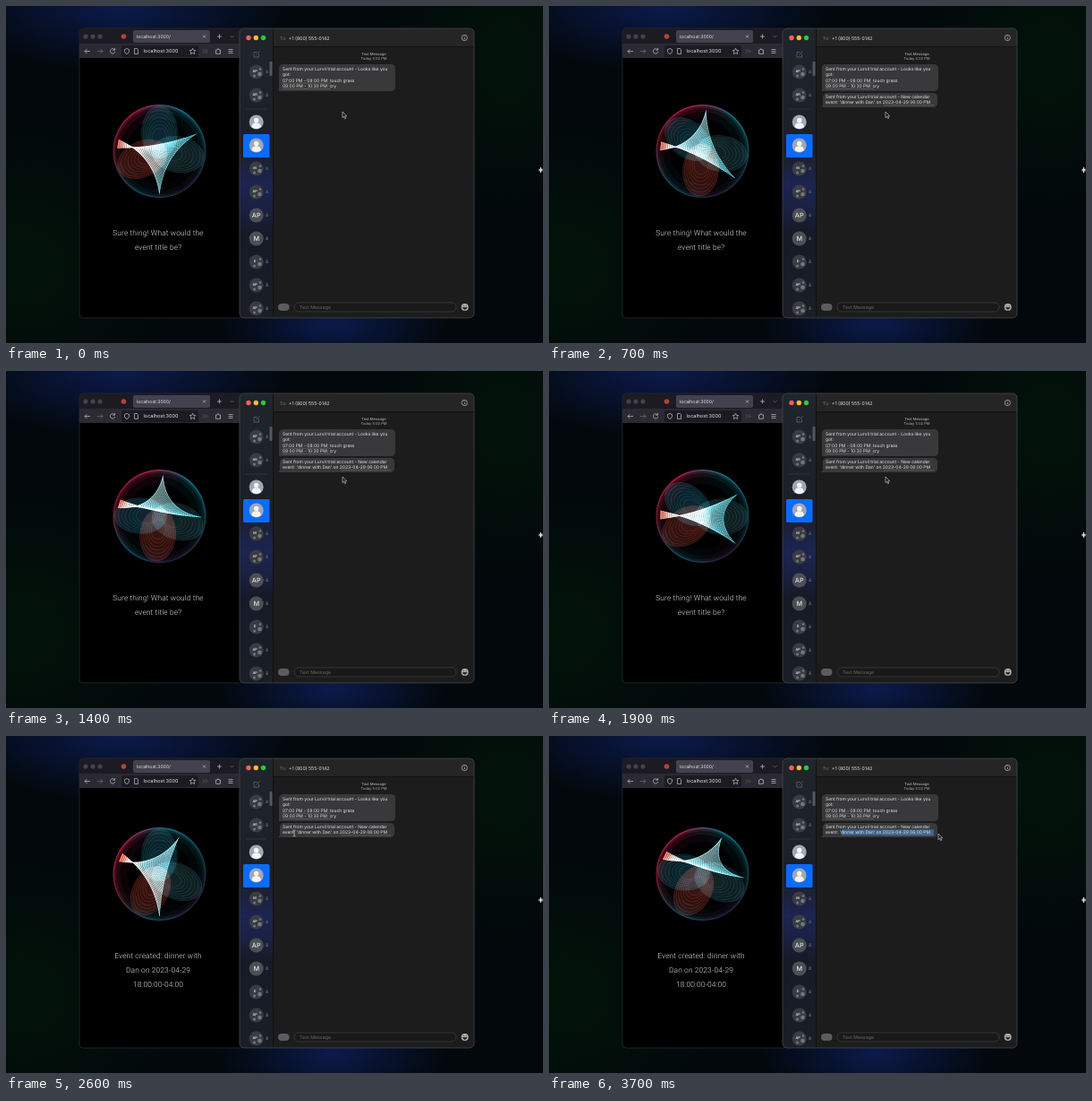
Animation, 600 px wide and 376 px high, one loop 3750 ms. Source, as an HTML page with a canvas:

```html
<!DOCTYPE html>
<html lang="en">
<head>
<meta charset="utf-8">
<style>
  html, body { margin: 0; width: 100%; height: 100%; overflow: hidden; background: #02080b; }
  svg, canvas { position: absolute; left: 0; top: 0; width: 600px; height: 376px; }
  text { font-family: Inter, sans-serif; fill: #e6e6e6; white-space: pre; text-rendering: geometricPrecision; }
  .reply text { font: 300 8.4px Roboto, sans-serif; letter-spacing: .13px; text-anchor: middle; fill: #dcdcdc; }
  .msg { font-size: 4.95px; }
  .mid { text-anchor: middle; }
  .line { fill: none; stroke: #c4c4c8; stroke-width: .7; }
  .dim { stroke: #707078; }
  .rule { stroke: #888; stroke-width: .4; }
</style>
</head>
<body>
<svg viewBox="0 0 600 376">
  <defs>
    <radialGradient id="navy"><stop stop-color="#0c1a4c"/><stop offset="1" stop-color="#0c1a4c" stop-opacity="0"/></radialGradient>
    <radialGradient id="green"><stop stop-color="#021309"/><stop offset="1" stop-color="#021309" stop-opacity="0"/></radialGradient>
    <linearGradient id="side" x2="0" y2="1">
      <stop stop-color="#20242b"/><stop offset=".42" stop-color="#1b1f29"/><stop offset=".54" stop-color="#1c2450"/>
      <stop offset=".62" stop-color="#1a2142"/><stop offset=".7" stop-color="#161a28"/><stop offset="1" stop-color="#1b1e25"/>
    </linearGradient>
  </defs>
  <rect width="600" height="376" fill="#02080b"/>
  <ellipse cx="20" cy="290" rx="180" ry="170" fill="url(#green)"/>
  <ellipse cx="560" cy="60" rx="150" ry="180" fill="url(#green)"/>
  <ellipse cx="130" cy="0" rx="190" ry="75" fill="url(#navy)"/>
  <ellipse cx="365" cy="355" rx="130" ry="55" fill="url(#navy)"/>

  <!-- browser -->
  <rect x="82" y="25" width="184" height="323" rx="4" stroke="#303038" stroke-width=".7"/>
  <path d="M82 42V29q0-4 4-4H266V42z" fill="#1c1b22"/>
  <path d="M82 42H266V58H82z" fill="#2b2a33"/>
  <g fill="#44434a"><circle cx="89" cy="34" r="2.6"/><circle cx="97" cy="34" r="2.6"/><circle cx="105" cy="34" r="2.6"/></g>
  <circle cx="131.5" cy="34" r="2.8" fill="#b0453a"/>
  <rect x="142" y="27" width="86" height="14" rx="2" fill="#42414d"/>
  <text x="146" y="36" font-size="5.1">localhost:3000/</text>
  <rect x="129" y="44" width="86" height="13" rx="2" fill="#1c1b22"/>
  <text x="153.5" y="52.4" font-size="5.5">localhost:3000</text>
  <path class="line" d="M220 32.500l3 3m0-3l-3 3M236 34h5m-2.500-2.500v5M88 50.500h6m-6 0l2.500-2.500m-2.500 2.500l2.500 2.500M121.500 49a2.700 2.700 0 1 0 .3 2m-.2-4v2.200h-2.200M135 47.500l2.500 1v2q0 2-2.500 3.200q-2.500-1.200-2.500-3.200v-2zM143.500 47.500h3l1 1.200v4.800h-4zM208.500 47.200l1 2.200 2.300.2-1.700 1.600.5 2.400-2.100-1.200-2.100 1.200.5-2.400-1.700-1.600 2.300-.2zM234.500 49h1.500q1-3 2 0h1.500v4.300h-5zM248.500 48.500h5m-5 2h5m-5 2h5"/>
  <path class="line dim" d="M102 50.500h6m0 0l-2.500-2.500m2.500 2.500l-2.500 2.500M250.500 33l2 2 2-2M220 48.500l2 2-2 2m3-4l2 2-2 2"/>
  <g id="ask" class="reply">
    <text x="170" y="256">Sure thing! What would the</text>
    <text x="170" y="272">event title be?</text>
  </g>
  <g id="done" class="reply">
    <text x="170" y="248">Event created: dinner with</text>
    <text x="170" y="264">Dan on 2023-04-29</text>
    <text x="170" y="280">18:00:00-04:00</text>
  </g>

  <!-- chat -->
  <rect x="261" y="25" width="262" height="323" rx="5" fill="#1c1c1c"/>
  <path d="M298.500 25H518q5 0 5 5V45H298.500z" fill="#252525"/>
  <path d="M298.500 25V348H266q-5 0-5-5V30q0-5 5-5z" fill="url(#side)"/>
  <path d="M298.500 25V348M298.500 45.500H523" stroke="#0d0d0d" stroke-width=".7"/>
  <rect x="261" y="25" width="262" height="323" rx="5" fill="none" stroke="#46474b" stroke-width=".8"/>
  <g><circle cx="271" cy="35.5" r="2.7" fill="#fe5f57"/><circle cx="279.3" cy="35.5" r="2.7" fill="#febc2e"/><circle cx="287.5" cy="35.5" r="2.7" fill="#28c840"/></g>
  <path class="line dim" d="M280.500 51.500h-3.500v5.500h5.500v-3.500M279.500 54.500l4-4"/>
  <path d="M268 115h23" stroke="#353a44" stroke-width=".7"/>
  <rect x="294.5" y="62" width="3" height="16" rx="1" fill="#54575c"/>
  <rect x="265" y="143" width="29.5" height="26" rx="1.5" fill="#0a6cff"/>
  <g id="people"></g>
  <text x="306" y="37.8" font-size="5.2" style="fill:#777">To:</text>
  <text x="316" y="37.8" font-size="5.2">+1 (800) 555-0142</text>
  <circle class="line" cx="512.3" cy="35.5" r="3.1"/><path class="line" d="M512.300 35v2.200m0-3.800v.8"/>
  <g class="mid" font-size="4.1"><text x="411" y="55.3" font-weight="500" style="fill:#aaa">Text Message</text><text x="411" y="60.3" style="fill:#aaa">Today 5:02 PM</text></g>
  <path d="M305 95v-25q0-5 5-5h120q5 0 5 5v20q0 5-5 5z" fill="#39393b"/>
  <g class="msg">
    <text x="309" y="72">Sent from your Lurvil trial account - Looks like you</text>
    <text x="309" y="78.3">got:</text>
    <text x="309" y="84.8">07:00 PM - 08:00 PM: touch grass</text>
    <text x="309" y="91.1">09:00 PM - 10:30 PM: cry</text>
    <path class="rule" d="M309 86.200h54M309 92.500h54"/>
  </g>
  <g id="news" class="msg">
    <path d="M304 113q2-1 2-3v-8q0-5 5-5h118q5 0 5 5v6q0 5-5 5z" fill="#39393b"/>
    <rect id="mark" x="327" y="104.3" width="0" height="6.6" fill="#3f6590"/>
    <text x="309" y="103">Sent from your Lurvil trial account - New calendar</text>
    <text x="309" y="109.3">event: 'dinner with Dan' on 2023-04-29 06:00 PM</text>
    <path class="rule" d="M374 110.700h56"/>
  </g>
  <rect x="304" y="332" width="12.5" height="8" rx="4" fill="#5c5c60"/>
  <rect x="322" y="331" width="181" height="10" rx="5" fill="#191919" stroke="#414144" stroke-width=".7"/>
  <text x="328" y="337.9" font-size="5.3" style="fill:#69696c">Text Message</text>
  <circle cx="512.7" cy="336" r="4" fill="#b0b0b3"/>
  <path d="M510.300 336.500q2.400 4 4.800 0zM511.300 334v1.200m2.800-1.200v1.200" fill="#222" stroke="#222" stroke-width=".7"/>

  <circle cx="598" cy="183" r="4" fill="#000"/>
  <path d="M595 183h5m-2.500-3v6M596 181.500l3 3m0-3l-3 3" stroke="#eee"/>
  <path id="arrow" d="M0-3V3.600L1.500 2.200 2.700 4.700 3.700 4.200 2.600 1.800H4.600z" fill="#111" stroke="#ddd" stroke-width=".6"/>
  <path id="beam" class="line" d="M-1.500-3.500Q0-3.500 0-2.500V2.500Q0 3.500-1.500 3.500M1.500-3.500Q0-3.500 0-2.500M0 2.500Q0 3.500 1.500 3.500"/>
</svg>
<canvas id="orb" width="1200" height="752"></canvas>

<script>
const $ = id => document.getElementById(id);
const LOOP = 3750, STEP = 50, NEWS_AT = 300, REPLY_AT = 2300;
const TAU = Math.PI * 2, RADIUS = 52;
const mix = (a, b, u) => a + (b - a) * u;
const clamp = u => Math.min(1, Math.max(0, u));

// Sidebar: '*' is a silhouette, '!' marks a single contact, the rest are groups
$('people').innerHTML = ['AP', 'AR', '*', '*', 'M', 'AP', 'AP!', 'M!', 'D', 'AP', 'AP'].map((name, i) => {
  const y = i < 2 ? 73.5 + i * 26 : 77.5 + i * 26;
  const disc = fill => `<circle cx="279.7" cy="${y}" r="8" fill="${fill}"/>`;
  const bell = `<path d="M289.800 ${y + 1.5}q.8-1 .8-2.500t1-1.500 1 1.500.8 2.500z" fill="#484d59"/>`;
  if (name === '*') return disc('#a2a7b1') +
    `<g fill="#f4f4f6"><circle cx="279.7" cy="${y - 2}" r="2.7"/><path d="M274.500 ${y + 5.5}q0-4.700 5.200-4.700t5.200 4.700q-5.200 4-10.400 0"/></g>`;
  if (name.endsWith('!')) return disc('#4c4f55') + bell +
    `<text class="mid" x="279.7" y="${y + 2.6}" font-size="7.2" font-weight="500">${name.slice(0, -1)}</text>`;
  return disc('#393c43') + bell +
    `<text class="mid" x="278" y="${y}" font-size="3.8" font-weight="600">${name}</text>
     <g fill="#74777e"><circle cx="283.5" cy="${y + 2.5}" r="2.3"/><circle cx="277.5" cy="${y + 4.5}" r="1.5"/><circle cx="284" cy="${y - 3}" r="1.3"/></g>`;
}).join('');

const ctx = $('orb').getContext('2d');
const polar = (degrees, r) => [r * Math.cos(degrees * TAU / 360), r * Math.sin(degrees * TAU / 360)];
const blend = (p, q, u) => [mix(p[0], q[0], u), mix(p[1], q[1], u)];
const bend = (p, c, q, u) => blend(blend(p, c, u), blend(c, q, u), u);
// Control point that draws the side between two arm tips in towards the middle
const waist = (p, q) => [(p[0] + q[0]) * .13, (p[1] + q[1]) * .13];

function drawRing(s) {
  const glow = ctx.createConicGradient(.3 * Math.sin(s * TAU / 3.75), 0, 0);
  const colors = ['#0c3038', '#22152a', '#0b3a46', '#5c1224', '#861436', '#0b5a66', '#0c3038'];
  colors.forEach((color, i) => glow.addColorStop(i / (colors.length - 1), color));
  ctx.strokeStyle = glow;
  for (let width = 1; width <= 16; width *= 2) {
    ctx.globalAlpha = .5 / Math.sqrt(width);
    ctx.lineWidth = width;
    ctx.beginPath();
    ctx.arc(0, 0, RADIUS - width / 2, 0, TAU);
    ctx.stroke();
  }
  ctx.globalAlpha = 1;
}

// Translucent oval lying opposite an arm
function drawLobe(degrees, rgb) {
  ctx.save();
  ctx.rotate((degrees + 180) * TAU / 360);
  for (let i = 0; i < 7; i++) {
    ctx.beginPath();
    ctx.ellipse(21 - i, 0, 29 - 3 * i, 20 - 2 * i, 0, 0, TAU);
    ctx.fillStyle = `rgba(${rgb},${i ? .02 : .22})`;
    ctx.fill();
    ctx.strokeStyle = `rgba(${rgb},.28)`;
    ctx.stroke();
  }
  ctx.restore();
}

// Three-armed sheet: threads fan from the left tip to the side joining the other two
function drawSheet(left, top, right) {
  const above = waist(left, top), below = waist(left, right), far = waist(top, right);
  const thread = u => ({
    from: [left[0] - left[1] * .2 * (u - .5), left[1] + left[0] * .2 * (u - .5)],
    via: blend(above, below, u),
    to: bend(top, far, right, u)
  });
  const shade = ctx.createLinearGradient(left[0], left[1], -left[0], -left[1]);
  shade.addColorStop(0, '#d8604c');
  shade.addColorStop(.22, '#a8ccd0');
  shade.addColorStop(.5, '#b4f0f4');
  shade.addColorStop(1, '#22a4bc');

  const first = thread(0), last = thread(1);
  ctx.beginPath();
  ctx.moveTo(...first.from);
  ctx.quadraticCurveTo(...first.via, ...first.to);
  ctx.quadraticCurveTo(...far, ...last.to);
  ctx.quadraticCurveTo(...last.via, ...last.from);
  ctx.closePath();
  ctx.fillStyle = ctx.strokeStyle = shade;
  ctx.globalAlpha = .4;
  ctx.fill();
  ctx.globalAlpha = .6;
  ctx.stroke();

  ctx.globalAlpha = .45;
  ctx.setLineDash([1.4, .6]);
  for (let u = 0; u <= 1; u += 1 / 30) {
    const { from, via, to } = thread(u);
    ctx.beginPath();
    ctx.moveTo(...from);
    ctx.quadraticCurveTo(...via, ...to);
    ctx.stroke();
  }
  ctx.setLineDash([]);
  ctx.globalAlpha = 1;
}

function drawOrb(t) {
  const s = t / 1000, sway = period => Math.cos(s * TAU / period);
  const left = 190 + 5 * s * Math.cos((s - 2.6) * TAU / 1.2);
  const top = -65 + 40 * sway(2.1);
  const right = 45 + 45 * sway(2.6);

  ctx.setTransform(2, 0, 0, 2, 0, 0);
  ctx.clearRect(0, 0, 600, 376);
  ctx.translate(171.5, t < REPLY_AT ? 162 : 154);
  ctx.globalCompositeOperation = 'lighter';
  drawRing(s);
  ctx.lineWidth = .6;
  drawLobe(left, '50,105,115');
  drawLobe(top, '175,65,50');
  drawLobe(right, '30,120,135');
  drawSheet(polar(left, 47), polar(top, 45), polar(right, 47));
}

function show(el, visible) {
  el.style.display = visible ? '' : 'none';
}
function place(el, x, y, visible) {
  el.setAttribute('transform', `translate(${x} ${y})`);
  show(el, visible);
}

function drawPointer(t) {
  const approach = clamp((t - 2100) / 400), nudge = clamp((t - 2750) / 350), drag = clamp((t - 3350) / 300);
  const ease = approach * approach * (3 - 2 * approach);
  const x = mix(376, 322, ease) + 4 * nudge + 109 * drag;
  const y = mix(121, 108.5, ease) - 1.5 * nudge + 5 * drag;
  const overText = approach > .85 && x < 431;
  place($('arrow'), x, y, !overText);
  place($('beam'), x, y, overText);
  $('mark').setAttribute('width', drag ? clamp((x - 327) / 103) * 103 : 0);
}

function render(now) {
  const t = Math.floor(now % LOOP / STEP) * STEP;
  show($('news'), t >= NEWS_AT);
  show($('ask'), t < REPLY_AT);
  show($('done'), t >= REPLY_AT);
  drawPointer(t);
  drawOrb(t);
}

let start;
function tick(now) {
  start ??= now;
  render(now - start);
  requestAnimationFrame(tick);
}
render(0);
requestAnimationFrame(tick);
</script>
</body>
</html>
```
